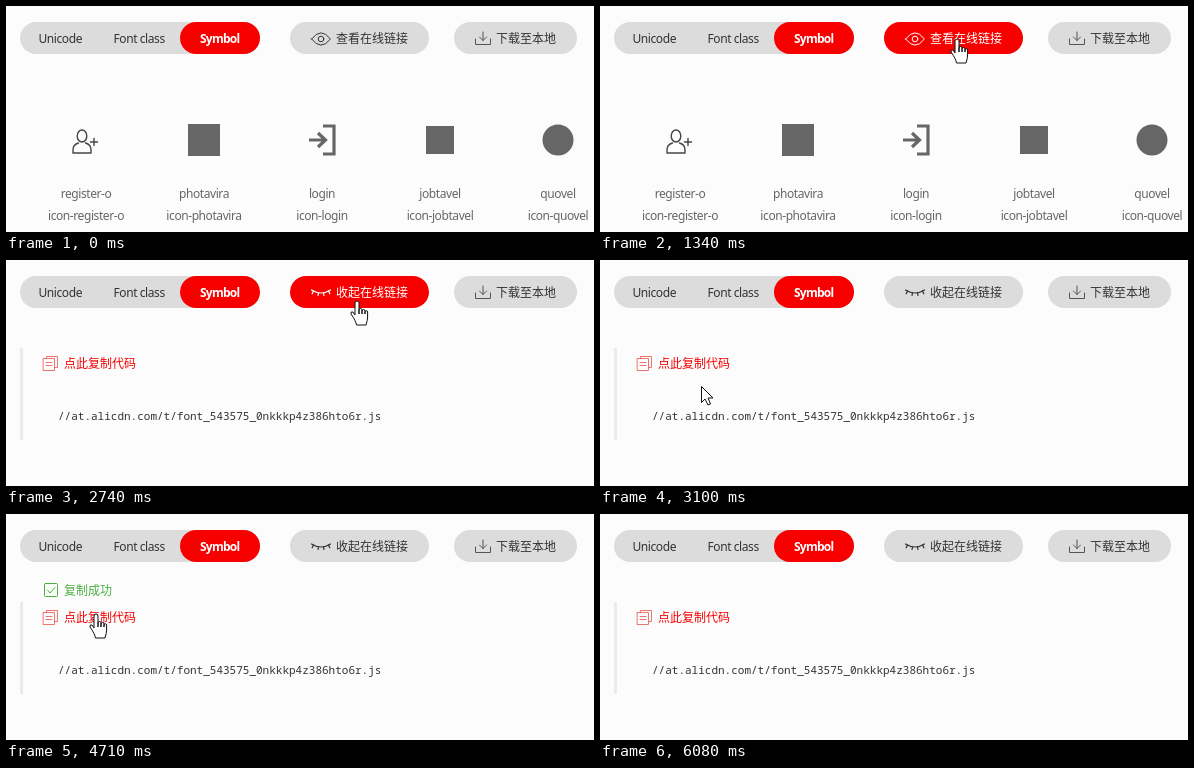
An HTML page for the animation above (7260 ms loop, 588 by 226 pixels).

```html
<!DOCTYPE html>
<html lang="zh">
<head>
<meta charset="utf-8">
<title>Icon panel</title>
<style>
html, body { margin: 0; width: 100%; height: 100%; overflow: hidden; background: #fcfcfc; }
svg { display: block; width: 588px; height: 226px; }
text { font: 12px "Noto Sans", "Open Sans", sans-serif; letter-spacing: -.42px; fill: currentColor; }
.strong { font-weight: 600; letter-spacing: -.75px; }
.zh { font: 12px "Noto Sans CJK SC", "Noto Sans CJK", sans-serif; letter-spacing: 0; }
.code { font: 11px "Noto Sans Mono", "DejaVu Sans Mono", monospace; letter-spacing: 0; }
.mid { text-anchor: middle; }
.pill { height: 32px; rx: 16px; fill: #dcdcdc; }
.line { fill: none; stroke: currentColor; stroke-linecap: round; stroke-linejoin: round; }
</style>
</head>
<body>
<svg viewBox="0 0 588 226" color="#333">
  <rect class="pill" x="14" y="16" width="240"/>
  <rect class="pill" x="174" y="16" width="80" style="fill:#f60000"/>
  <text x="32.5" y="37">Unicode</text>
  <text x="107.5" y="37">Font class</text>
  <text class="strong" x="194" y="37" color="#fff">Symbol</text>

  <rect id="pill" class="pill" x="284" y="16" width="139"/>
  <g id="face">
    <g id="openEye" class="line" transform="translate(315 33)">
      <path d="M-9.4 0Q0 -12.4 9.4 0Q0 12.4 -9.4 0Z"/>
      <circle r="2.8"/>
    </g>
    <g id="shutEye" class="line" stroke-width="1.2" transform="translate(315 30)">
      <path d="M-9.5 0Q0 6 9.5 0"/>
    </g>
    <text id="pillText" class="zh" x="330" y="37"></text>
  </g>

  <rect class="pill" x="448" y="16" width="123"/>
  <path class="line" color="#555" transform="translate(477 26)" d="M-7.5 7V12.5H7.5V7M0 0V8.5M-3.5 5L0 8.5L3.5 5"/>
  <text class="zh" x="490" y="37">下载至本地</text>

  <g id="icons" color="#666" fill="#666">
    <g class="line" color="#444" stroke-width="1.4" transform="translate(76 130)">
      <ellipse rx="4.8" ry="6"/>
      <path d="M-3.5 7Q-9 8.5 -9 14V17H9V14Q9 8.5 3.5 7M12 2.5V9.5M8.5 6H15.5"/>
    </g>
    <g fill="none" stroke="#666" stroke-width="3.2" transform="translate(316 134)">
      <path d="M1 -14H12V14H1M-13 0H3M-4 -7L3.5 0L-4 7"/>
    </g>
    <rect x="182" y="118" width="32" height="32"/>
    <rect x="420" y="120" width="28" height="28"/>
    <circle cx="552" cy="134" r="15.5"/>
  </g>

  <g id="panel">
    <rect x="14" y="88" width="3" height="92" fill="#ebebeb"/>
    <g id="toast" color="#4bae3f">
      <rect class="line" x="38.5" y="69.5" width="13" height="13" rx="1"/>
      <path class="line" d="M41.5 76L44 79L49 73.5"/>
      <text class="zh" x="58" y="80.5">复制成功</text>
    </g>
    <g color="#f60000">
      <path class="line" color="#e8554c" stroke-width=".8" d="M40.5 98.5V96.5H51.5V107.5H49M37.5 98.5H48.5V110.5H37.5ZM40 102.5H46M40 105.5H46"/>
      <text class="zh" x="58" y="108">点此复制代码</text>
    </g>
    <text class="code" x="52" y="160">//at.alicdn.com/t/font_543575_0nkkkp4z386hto6r.js</text>
  </g>

  <g id="cursor" fill="#fff" stroke="#111" stroke-linejoin="round">
    <path id="arrow" d="M.5 .5V16.5L4 13L7 19L9.5 18L7 12H12Z"/>
    <path id="hand" d="M-2 14V2a2 2 0 0 1 4 0V13V9a1.5 1.5 0 0 1 3 0V13V10a1.5 1.5 0 0 1 3 0V13V11a1.3 1.3 0 0 1 2.6 0V16Q10.6 19 9 24H-.5Q-1 20 -6 13Q-6.5 10 -4 11Z"/>
  </g>
</svg>
<script>
const LOOP = 7260, STEP = 60;
const el = id => document.getElementById(id);
const show = (id, on) => el(id).setAttribute("visibility", on ? "visible" : "hidden");
const mix = (a, b, u) => a + (b - a) * u;
const ease = u => u * u * (3 - 2 * u);

function add(parent, tag, attrs, text = "") {
  const node = document.createElementNS("http://www.w3.org/2000/svg", tag);
  for (const key in attrs) node.setAttribute(key, attrs[key]);
  node.textContent = text;
  el(parent).append(node);
}

function ramp(t, a, b) {
  if (t >= b) return 1;
  return Math.max(0, Math.floor((t - a) / STEP) * STEP / (b - a));
}

["register-o", "photavira", "login", "jobtavel", "quovel"].forEach((name, i) => {
  const x = 80 + 118 * i;
  add("icons", "text", { class: "mid", x, y: 192 }, name);
  add("icons", "text", { class: "mid", x, y: 214 }, "icon-" + name);
});

// Lashes fan out below the closed lid
for (let x = -7.5; x <= 7.5; x += 5) {
  const y = 3 - x * x / 30;
  add("shutEye", "path", { d: `M${x} ${y}l${x * .18} 2.7` });
}

const moves = [
  { start: 870, end: 1340, from: [374, -8], to: [357, 33] },
  { start: 2740, end: 3100, from: [351, 41], to: [101, 126] },
  { start: 3100, end: 3550, from: [101, 126], to: [90, 100] },
  { start: 5400, end: 6080, from: [90, 100], to: [515, 232] }
];

function pointerAt(t) {
  const move = moves.findLast(m => t >= m.start) || moves[0];
  const u = ease(ramp(t, move.start, move.end));
  return move.from.map((v, i) => Math.round(mix(v, move.to[i], u)));
}

function draw(t) {
  const open = t >= 1900;
  const [x, y] = pointerAt(t);
  const inside = (l, top, r, b) => x >= l && x <= r && y >= top && y <= b;

  const hover = ramp(t, 1030, 1280) - ramp(t, 2780, 3040);
  const ground = mix(220, 0, hover);
  const ink = mix(51, 255, hover);
  el("pill").style.fill = `rgb(${mix(220, 246, hover)}, ${ground}, ${ground})`;
  el("face").style.color = `rgb(${ink}, ${ink}, ${ink})`;
  el("pillText").textContent = open ? "收起在线链接" : "查看在线链接";
  show("openEye", !open);
  show("shutEye", open);
  show("icons", !open);
  show("panel", open);

  const fadeIn = ramp(t, 4260, 4660);
  const rise = fadeIn * (2 - fadeIn) - ramp(t, 4720, 4920);
  el("toast").setAttribute("opacity", rise);
  el("toast").setAttribute("transform", `translate(0 ${27 * (1 - rise)})`);

  const present = t >= 870 && t < 6080;
  const link = inside(284, 16, 423, 48) || open && inside(37, 96, 130, 112);
  el("cursor").setAttribute("transform", `translate(${x} ${y})`);
  show("hand", present && link);
  show("arrow", present && !link);
}

const start = performance.now();
function tick() {
  draw((performance.now() - start) % LOOP);
  requestAnimationFrame(tick);
}
tick();
</script>
</body>
</html>
```
